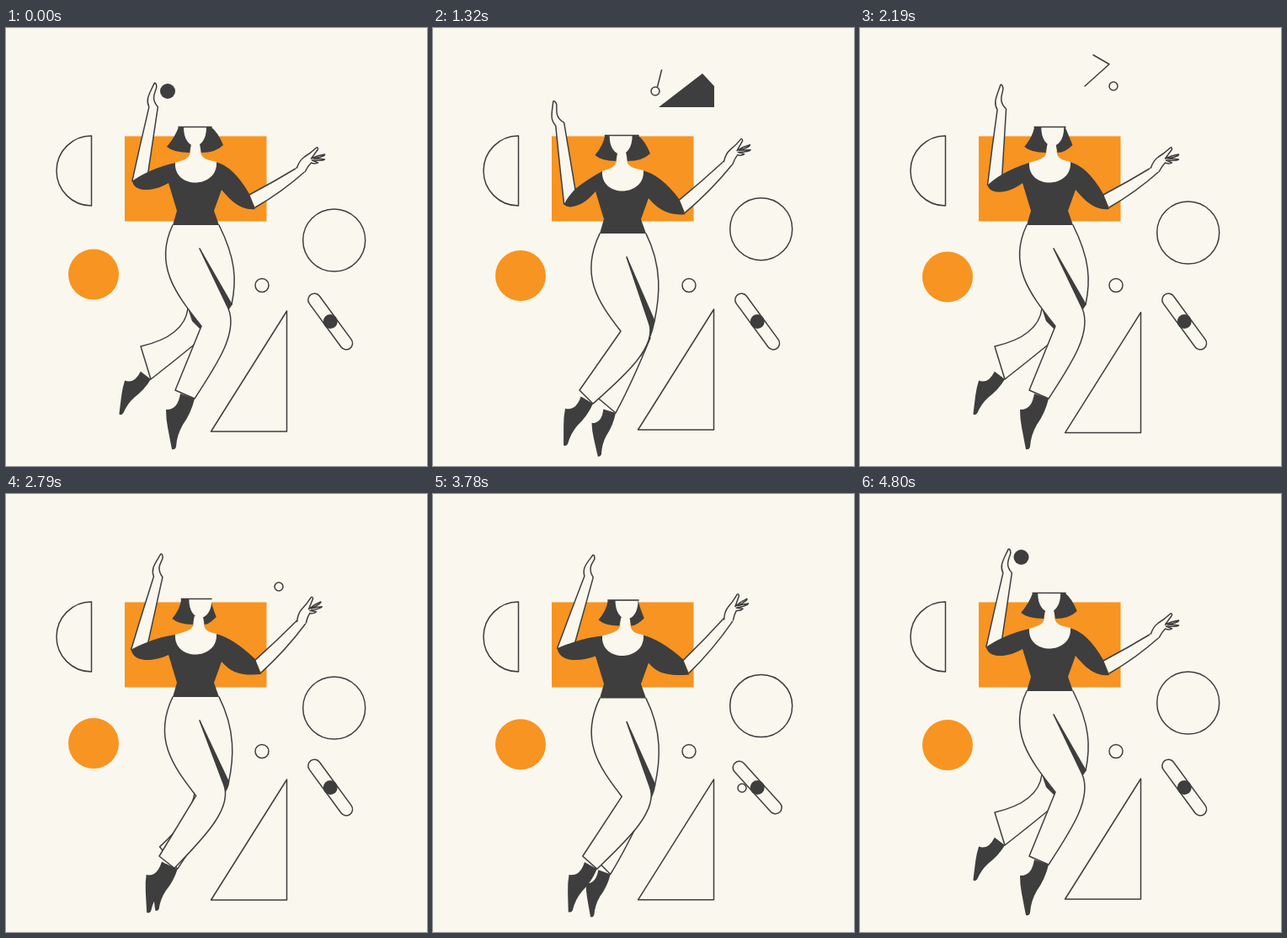
Write an HTML page with a canvas that moves like this. It is 500 by 520 pixels and loops after 4830 ms.

```html
<!DOCTYPE html>
<html lang="en">
<head>
<meta charset="utf-8">
<title>Dancer</title>
<style>
html, body { margin: 0; width: 100%; height: 100%; overflow: hidden; background: #f9f7ee; }
canvas { display: block; width: 500px; height: 520px; }
</style>
</head>
<body>
<canvas id="stage" width="500" height="520"></canvas>
<script>
const ctx = document.getElementById('stage').getContext('2d');
const LOOP = 4830, STEP = 30, BEAT = 2190;
const CREAM = '#f9f7ee', DARK = '#3e3e3e', ORANGE = '#f89421';

const clamp = v => Math.max(0, Math.min(1, v));
const mix = (a, b, k) => a + (b - a) * k;
const between = ([ax, ay], [bx, by], k) => [mix(ax, bx, k), mix(ay, by, k)];
const off = ([x, y], dx, dy) => [x + dx, y + dy];
const ease = v => (1 - Math.cos(Math.PI * clamp(v))) / 2;
const span = (t, a, b) => clamp((t - a) / (b - a));

// Smooth curve through [time, value] pairs, at rest at both ends.
function curve(keys, t) {
  const n = keys.length - 1;
  if (t <= keys[0][0]) return keys[0][1];
  if (t >= keys[n][0]) return keys[n][1];
  const i = keys.findIndex(key => key[0] >= t) - 1;
  const slope = j => j < 1 || j >= n ? 0
    : (keys[j + 1][1] - keys[j - 1][1]) / (keys[j + 1][0] - keys[j - 1][0]);
  const [t0, a] = keys[i], [t1, b] = keys[i + 1];
  const h = t1 - t0, k = (t - t0) / h, q = 1 - k;
  return a * (1 + 2 * k) * q * q + slope(i) * h * k * q * q
    + b * k * k * (3 - 2 * k) - slope(i + 1) * h * k * k * q;
}

const floating = {
  ring: [[0, 252], [570, 239], [2190, 243], [2790, 254], [4800, 248]],
  disc: [[0, 292.5], [570, 288], [1320, 294], [2790, 296], [4800, 298]],
  tri: [[0, 479], [570, 472.5], [1320, 477], [2790, 482], [4800, 481]]
};
const swingKeys = [[0, 0.71], [700, 0], [2190, 0.55], [3300, 1], [4830, 0.71]];
const beadX = [[1200, 277], [1320, 264], [2190, 301], [2790, 324], [3780, 367], [4150, 304]];
const beadY = [[1200, 34], [1320, 75], [2190, 69], [2790, 110], [3780, 349], [4150, 305]];

// Depth of the knee bend: 0 leaping, 1 lowest.
function crouch(t) {
  if (t < BEAT) return ease(1 - Math.abs(t / (BEAT / 2) - 1));
  return t < 3300 ? ease((t - BEAT) / 1110) : ease((4700 - t) / 1400);
}

function draw(d, fill, line) {
  const path = new Path2D(d);
  if (fill) { ctx.fillStyle = fill; ctx.fill(path); }
  if (line) { ctx.strokeStyle = DARK; ctx.stroke(path); }
}

function circle(x, y, r, fill, line) {
  if (r > 0) draw(`M${x - r},${y}a${r},${r} 0 1 1 ${2 * r},0a${r},${r} 0 1 1 ${-2 * r},0Z`, fill, line);
}

function placed(x, y, deg, scale, fn) {
  ctx.save();
  ctx.translate(x, y);
  ctx.rotate(deg * Math.PI / 180);
  ctx.scale(scale, scale);
  fn();
  ctx.restore();
}

function scenery(t) {
  const base = curve(floating.tri, t);
  draw('M141,128.5H309.5V229.5H141Z', ORANGE);
  draw('M101.5,128V211A41.5,41.5 0 0 1 101.5,128Z', null, true);
  circle(104, curve(floating.disc, t), 30, ORANGE);
  circle(389.7, curve(floating.ring, t), 37, null, true);
  circle(304, 305.5, 8, null, true);
  draw(`M333.5,${base - 143}V${base}H243.5Z`, null, true);
  const hit = Math.max(0, t - 3700);
  const wobble = -8.3 * Math.exp(-hit / 250) * Math.sin(hit / 51);
  placed(385.2, 348.5, 53.8 + wobble, 1, () =>
    draw('M-32,-7.5H32A7.5,7.5 0 0 1 32,7.5H-32A7.5,7.5 0 0 1 -32,-7.5Z', null, true));
  circle(385.2, 348.5, 8.5, DARK);
}

function juggling(t) {
  const morph = ease(span(t, 1000, 1280));
  if (t < 1280) {
    const x = mix(mix(192, 160, ease(t / 570)), 310, ease(span(t, 600, 1130)));
    circle(x, 75, mix(9, 12.5, span(t, 0, 570)) * (1 - morph), DARK);
  } else {
    circle(191.5, 75, 9 * Math.sin(span(t, 4200, 4700) * Math.PI / 2), DARK);
  }
  const size = morph * (1 - ease(span(t, 1350, 1750)));
  if (size > 0) placed(312, 76, 0, size, () => draw('M-44,18L8,-22L22,-7V18Z', DARK));

  if (t > 1420 && t < 2600) {
    const head = 61 * ease(span(t, 1420, 1800)), tail = 61 * ease(span(t, 2220, 2600));
    ctx.setLineDash([head - tail, 100]);
    ctx.lineDashOffset = -tail;
    draw('M277,32L296,43L267,69', null, true);
    ctx.setLineDash([]);
  }
  if (t >= 1200 && t < 4150) {
    const x = curve(beadX, t), y = curve(beadY, t);
    if (t > 1260 && t < 1420) draw(`M271.5,50L${x + 2.5},${y - 5}`, null, true);
    circle(x, y, 5 * (1 - span(t, 3950, 4150)), null, true);
  }
}

function boot([x, y], deg, scale) {
  placed(x, y, deg, scale, () => draw(
    'M-17,-6L0,0Q-4,17 -14,31Q-21,43 -22,57Q-23,61 -27,60Q-29,50 -32,34Q-34,24 -34,13Q-20,14 -17,-6Z', DARK));
}

function lowerBody(p, dy) {
  const k = Math.pow(p / 0.9, 0.75);
  const move = (x0, y0, x1, y1) => between([x0, y0], [x1, y1], k);
  const hipL = [198, 234 + dy], hipR = [253, 234 + dy], crotch = [230, 262 + dy];

  const pit = move(232, 354, 223, 360), knee = move(264, 333, 256, 349);
  const cuffL = move(201, 430, 174, 430), cuffR = move(224, 440, 190, 446);
  const side = move(268, 328, 263, 348);
  const fold = off(side, -4 - 12 * k ** 4, 6 + 35 * k ** 4);

  const backTop = move(216, 333, 228, 362), backEnd = move(227, 373, 258, 368);
  const heelCuff = move(160, 378, 192, 436), toeCuff = move(172, 417, 217, 457);
  const hip = `M${hipR}C${off(hipR, 20, 40)} ${off(side, 6, -28)} ${side}`;

  boot(toeCuff, mix(18, -2, k), 0.85);
  draw(`M${backTop}Q${move(212, 366, 222, 395)} ${heelCuff}L${toeCuff}Q${move(199, 396, 236, 422)} ${backEnd}`, CREAM, true);
  const crease = clamp(1 - k / 0.6);
  draw(`M${backTop}L${pit}L${off(pit, -1, 4 * crease)}L${off(pit, -11 * crease, -6 * crease)}Z`, crease && DARK);

  draw(`${hip}L${fold}L${crotch}L${hipL}Z`, CREAM);
  draw(hip, null, true);
  draw(`M${crotch}L${side}Q${off(between(side, fold, 0.5), 4 * k, 0)} ${fold}L${knee}Z`, DARK, true);

  boot(cuffR, 11 * k, 1 - 0.08 * k);
  draw(`M${hipL}C${off(hipL, -23.5, 49)} ${off(pit, -28, -36)} ${pit}L${cuffL}L${cuffR}` +
    `C${off(cuffR, 26 + 9 * k, -40 + 9 * k)} ${off(knee, 12, 29)} ${knee}L${crotch}`, CREAM, true);
}

function leftArm(elbow, root, swing) {
  const wrist = [145 + 42 * swing, 107 - 18 * swing];
  const tip = [136 + 58 * swing, 64 + 17 * (1 - swing) ** 2];
  const dx = tip[0] - wrist[0], dy = tip[1] - wrist[1], len = Math.hypot(dx, dy);
  // u runs from wrist to fingertip, v across the hand.
  const at = (u, v) => off(wrist, (dx * u - dy * v) / len, (dy * u + dx * v) / len);
  draw(`M${elbow}Q${off(between(elbow, wrist, 0.5), -3, 0)} ${at(0, -5)}` +
    `C${at(9, -10)} ${at(15, -6)} ${at(len, -1)}Q${at(len + 1, 1)} ${at(len - 4, 2)}` +
    `C${at(19, 2)} ${at(11, -5)} ${at(1, 5.5)}L${off(root, 0, 3)}`, CREAM, true);
}

function rightArm(elbow, wrist, turn) {
  const mid = between(elbow, wrist, 0.5);
  draw(`M${off(elbow, -7, -17)}Q${off(mid, -5, -8)} ${off(wrist, -5, 0)}` +
    `L${off(wrist, 5, 4)}Q${off(mid, 5, 4)} ${off(elbow, 0, -2)}`, CREAM, true);
  const hand = 'M-5,0Q-2,-9 4,-13Q12,-18 17,-23Q20,-26 20,-22L12,-11Q20,-15 28,-16' +
    'Q29,-14 15,-11Q22,-11 28,-10Q26,-8 13,-9Q18,-7 20,-6Q17,-4 12,-6Q8,-2 5,4';
  placed(...wrist, turn, 1, () => {
    draw(hand + 'L1,5.5L-7,1Z', CREAM);
    draw(hand, null, true);
  });
}

function head(turn) {
  const neck = 225 + turn * 0.6, crown = 205 + turn * 0.5;
  const left = 191 + Math.abs(turn), right = 258 - Math.max(0, turn) * 1.3;
  draw(`M${neck - 6},136V147C${neck - 7},156 209,157 201,160C199,192 252,191 250,159` +
    `C242,157 ${neck + 7},156 ${neck + 6},147V136Z`, CREAM);
  draw(`M${crown},117.5H243.5Q${right - 6},124 ${right},139` +
    `Q${right - 9},148 ${neck + 7},148L${neck + 5},138H${neck - 5}L${neck - 7},148` +
    `Q${left + 8},148 ${left},141Q${left + 10},129 ${crown},117.5Z`, DARK);
  draw(`M${211 + turn},118C${211 + turn},147 ${238 + turn},147 ${238 + turn},118Z`, CREAM);
  draw(`M${crown},117.5H244`, null, true);
}

function upperBody(t, p, dy) {
  const swing = curve(swingKeys, t);
  const elbow = [157 - 10 * swing, 203 - 30 * swing];
  const root = [169.5 - 1.5 * swing, 183 - 17 * swing];
  const sag = 16 - (elbow[1] - 179) * 0.48;
  leftArm(elbow, root, swing);

  const lift = (t < BEAT ? 0.47 : 1.23) * Math.pow(p, 0.6);
  const elbow2 = [296 + 8 * lift, 215 - 9 * lift];
  rightArm(elbow2, [350.5, 166 - 18 * lift - dy], -16 * lift);

  draw(`M201,160Q${off(between([201, 160], root, 0.5), 0, -2)} ${root}` +
    `Q${off(between(elbow, root, 0.5), -2, 0)} ${elbow}` +
    `C${off(elbow, 3, sag)} 177,${elbow[1] + sag * 0.9 - 1} 193,184` +
    `L203,217L198,234H253L247,217L256,192` +
    `C267,205 279,${elbow2[1] + 2} ${elbow2}L${off(elbow2, -7, -18)}Q270,164 249,159Q225,168 201,160Z`, DARK);

  head(t < 1450 ? -5 * Math.sin(Math.PI * t / 1450) : 6.7 * Math.sin(Math.PI * (t - 1450) / 3380));
}

function render(t) {
  ctx.fillStyle = CREAM;
  ctx.fillRect(0, 0, 500, 520);
  ctx.lineWidth = 1.5;
  ctx.lineJoin = ctx.lineCap = 'round';
  const p = crouch(t), dy = 11 * Math.pow(p, 0.8);
  scenery(t);
  lowerBody(p, dy);
  placed(0, dy, 0, 1, () => upperBody(t, p, dy));
  juggling(t);
}

const start = performance.now();
function tick(now) {
  const t = Math.max(0, now - start) % LOOP;
  render(Math.floor(t / STEP) * STEP);
  requestAnimationFrame(tick);
}
render(0);
requestAnimationFrame(tick);
</script>
</body>
</html>
```
